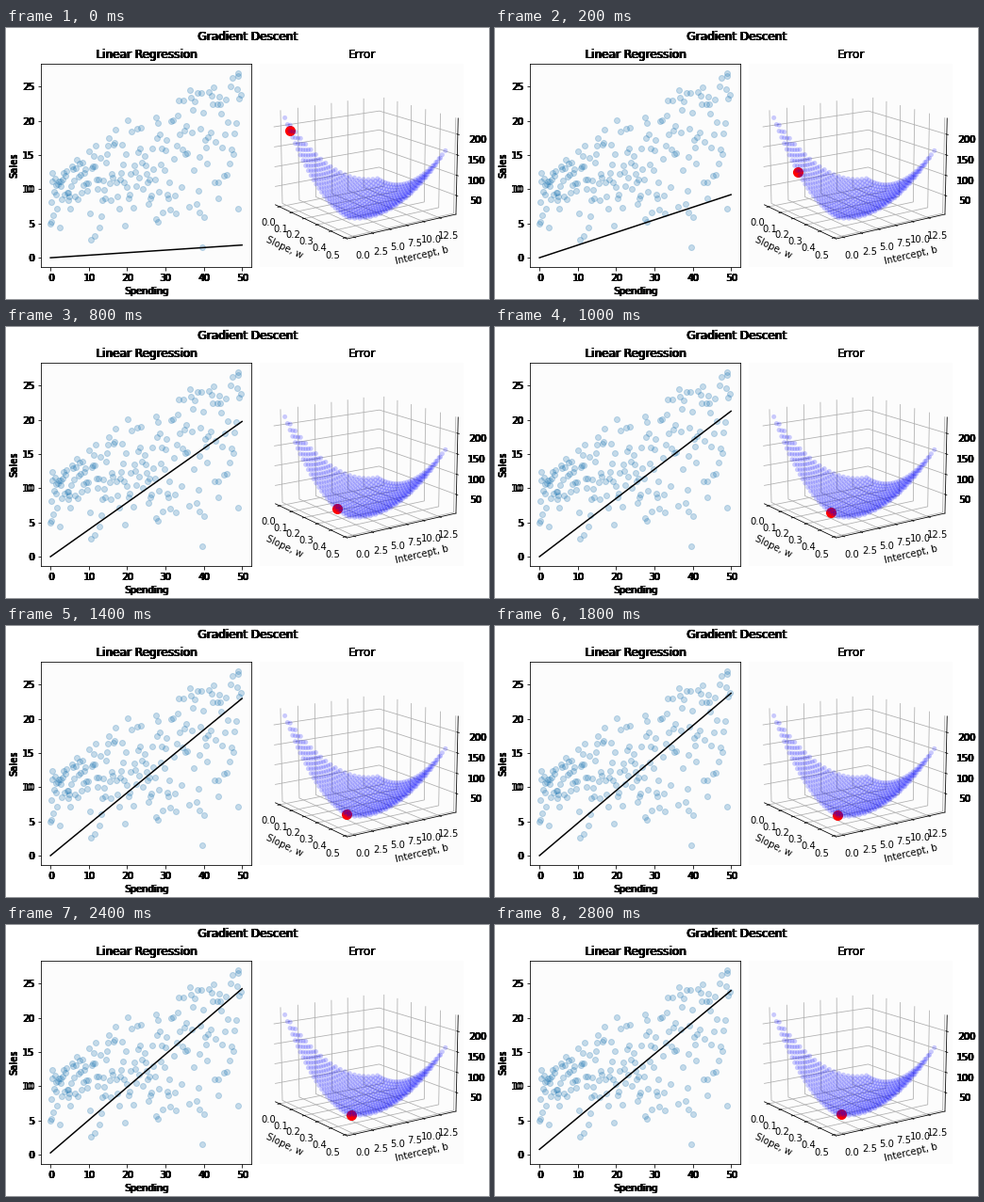
Recreate the animation shown at these times as a matplotlib script. Size 512x288 px, loop 3 s.

```python
import numpy as np
import matplotlib.pyplot as plt
from matplotlib.animation import FuncAnimation
from matplotlib.transforms import Affine2D

W, H, DPI = 512, 288, 72
PAPER = "#fcfcfc"

# Moments of spending (x) and sales (y)
MX, MY, VX, VY, CXY = 23.26, 14.02, 219.4, 27.08, 44.4
RATE = 1e-4

# Every fifth step first, then long leaps along the valley
STEPS = [*range(1, 57, 5), 1000, 2000, 3000]

# Points standing apart from the main cloud
OUTLIERS = [(39.6, 1.6), (11.6, 3.2), (48.9, 7.2), (27.5, 5.7), (28.1, 5.3),
            (38.9, 6.6), (43.7, 8.7), (48.9, 27.0), (49.6, 23.8), (0.3, 5.3)]


def sample(count, seed=7):
    """Sales grow with spending, more so where a hidden reach is high."""
    rng = np.random.default_rng(seed)
    even = (np.arange(count) + 0.5) / count
    spend = 49.4 * even ** 1.12
    reach = 296 * rng.permutation(even)
    sales = (7 + 0.0191 * reach + 0.029 * spend + 0.00101 * reach * spend
             - 4 * np.exp(-reach / 15) + rng.normal(0, 0.5, count))
    return spend, np.minimum(sales, 26.6)


def mse(w, b):
    return VY + w * w * VX - 2 * w * CXY + (MY - w * MX - b) ** 2


def descend(count):
    w = b = 0.0
    path = [(w, b)]
    for _ in range(count):
        miss = MY - w * MX - b
        w, b = w + RATE * (CXY - w * VX + MX * miss), b + RATE * miss
        path.append((w, b))
    return path


def limits(values):
    lo, hi = np.min(values), np.max(values)
    pad = 0.05 * (hi - lo)
    pad += (hi - lo + 2 * pad) / 48
    return lo - pad, hi + pad


def smear(text, shifts=(0, 0, 0, 1, 1, 1)):
    """Print a text several times, partly one pixel to the right."""
    draw = text.draw

    def repeat(renderer):
        base = text.get_transform()
        for dx in shifts:
            text.set_transform(base + Affine2D().translate(dx, 0))
            draw(renderer)
        text.set_transform(base)

    text.draw = repeat


def smear_axis(axis):
    smear(axis.label)
    for tick in axis.get_major_ticks():
        smear(tick.label1)


def box(left, top, right, bottom):
    return [left / W, 1 - bottom / H, (right - left) / W, (bottom - top) / H]


plt.rcParams["font.family"] = "DejaVu Sans"
fig = plt.figure(figsize=(W / DPI, H / DPI), dpi=DPI, facecolor="white")
smear(fig.suptitle("Gradient Descent", fontsize=12, y=0.99))

# Data and fitted line
ax = fig.add_axes(box(37, 37.7, 260.3, 254), facecolor=PAPER)
spend, sales = sample(190)
ax.scatter(spend, sales, color="C0", alpha=0.25)
ax.scatter(*zip(*OUTLIERS), color="C0", alpha=0.25)
line, = ax.plot([], [], "k", lw=1.5)
ax.set(xlim=(-2.5, 52.5), ylim=(-1.35, 28.35),
       xticks=range(0, 51, 10), yticks=range(0, 26, 5),
       xlabel="Spending", ylabel="Sales")
smear(ax.set_title("Linear Regression", y=1.0))
smear_axis(ax.xaxis)
smear_axis(ax.yaxis)

# Error surface
ax3 = fig.add_axes(box(269, 38, 485, 254), projection="3d", facecolor=PAPER)
ax3.view_init(elev=15, azim=-35)
slope, inter = np.meshgrid(np.arange(25) * 0.02, np.linspace(0, 14, 20))
error = mse(slope, inter)
ax3.scatter(slope.ravel(), inter.ravel(), error.ravel(),
            s=25, color="b", alpha=0.2, linewidths=0)
dot, = ax3.plot([0], [0], [mse(0, 0)], "ro", ms=10)
ax3.set_xlim(*limits(slope), view_margin=0)
ax3.set_ylim(*limits(inter), view_margin=0)
ax3.set_zlim(*limits(error), view_margin=0)
ax3.set_xticks(np.arange(6) / 10)
ax3.set_yticks(np.arange(6) * 2.5)
ax3.set_zticks([50, 100, 150, 200])
ax3.set_xlabel("Slope, w")
ax3.set_ylabel("Intercept, b")
title = ax3.set_title("Error", y=1.0)
title.set_y(1.0)  # 3D axes lower their title by default
smear(title)
smear_axis(ax3.zaxis)
for axis in (ax3.xaxis, ax3.yaxis, ax3.zaxis):
    axis.set_pane_color((1, 1, 1, 0))

path = descend(STEPS[-1])


def update(i):
    w, b = path[STEPS[i]]
    line.set_data([0, 50], [b, b + 50 * w])
    dot.set_data_3d([w], [b], [mse(w, b)])
    return line, dot


anim = FuncAnimation(fig, update, frames=len(STEPS), interval=200, repeat=True)
plt.show()
```
